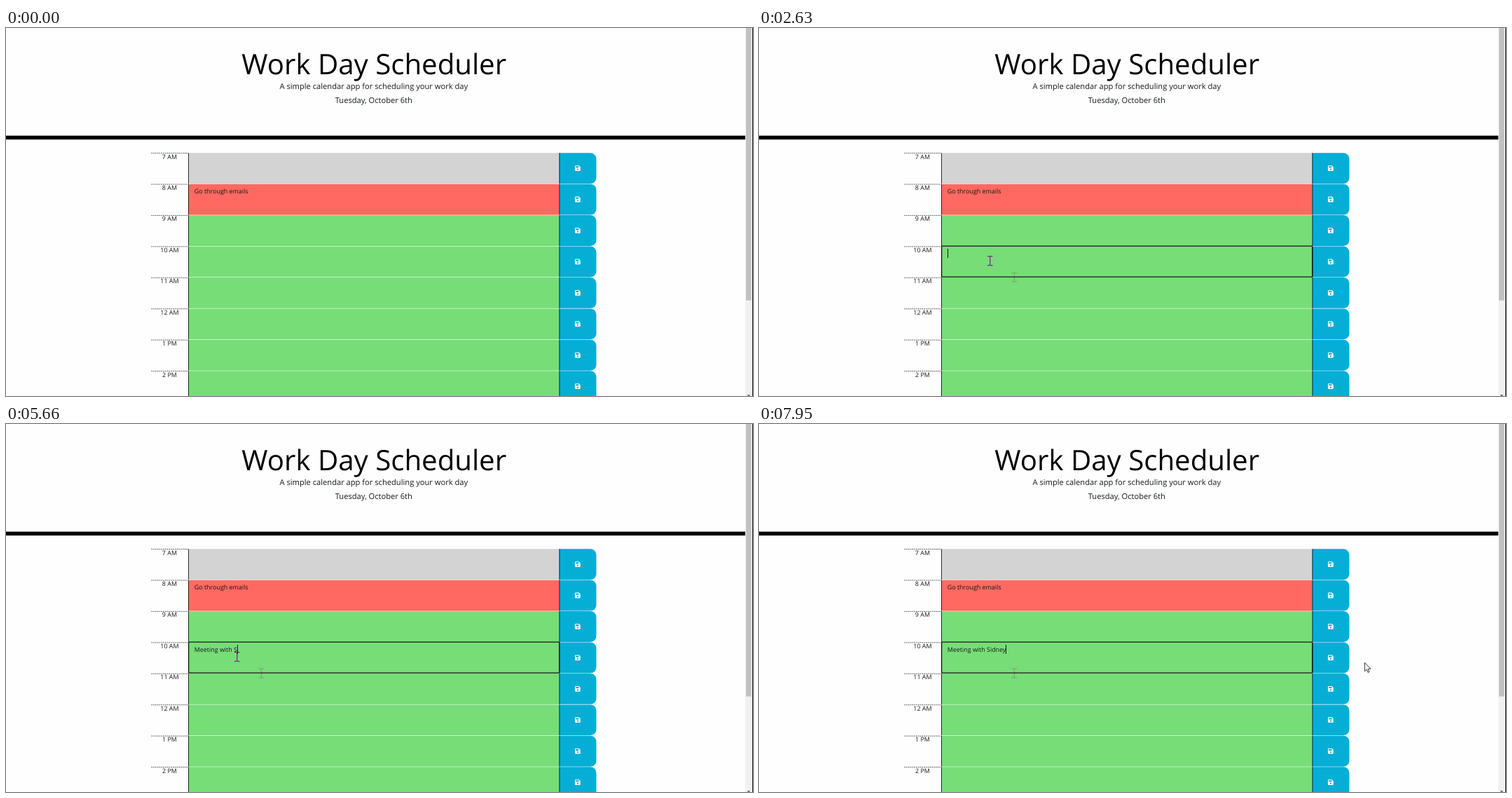
An HTML page for the animation above (8000 ms loop, 1066 by 525 pixels).

```html
<!DOCTYPE html>
<html lang="en">
<head>
<meta charset="utf-8">
<title>Work Day Scheduler</title>
<style>
html, body { margin: 0; width: 100%; height: 100%; overflow: hidden; background: #fefefe; }
svg { display: block; width: 1066px; height: 525px; }
text { font: 8.91px "Open Sans", sans-serif; fill: #16191c; white-space: pre; text-rendering: geometricPrecision; }
.mid { text-anchor: middle; }
.title { font-size: 40.2px; fill: #000; }
.lead { font-size: 11.15px; }
.beam { fill: none; stroke: #882288; stroke-width: 1.3; }
.ghost { stroke: #789a78; stroke-width: 1; }
.pointer { fill: #fff; stroke: #000; stroke-width: .8; stroke-linejoin: round; }
</style>
</head>
<body>
<svg viewBox="0 0 1066 525">
  <defs>
    <path id="beam" d="M-3.7-6.5H-1L0-6L1-6.5H3.7M0-6V6M-3.7 6.5H-1L0 6L1 6.5H3.7"/>
    <path id="disk" fill="#fff" fill-rule="evenodd" d="M1 0H5.8L7.8 2V6.8Q7.8 7.8 6.8 7.8H1Q0 7.8 0 6.8V1Q0 0 1 0ZM1.1 1.1V3.2H5.5V1.1ZM3.9 4.3A1.15 1.15 0 1 0 3.91 4.3Z"/>
  </defs>
  <text class="mid title" x="525.2" y="66">Work Day Scheduler</text>
  <text class="mid lead" x="524.8" y="87.3">A simple calendar app for scheduling your work day</text>
  <text class="mid lead" x="524.8" y="107.4">Tuesday, October 6th</text>
  <rect y="153.6" width="1055" height="5.5"/>
  <g id="rows"></g>
  <text x="268.8" y="235.6">Go through emails</text>

  <rect x="1055" width="10" height="525" fill="#f1f1f1"/>
  <rect x="1056" width="7.5" height="388.7" fill="#c1c1c1"/>
  <path d="M1057.6 523.2H1062L1059.8 525.6Z" fill="#505050"/>
  <rect x="1065" width="1" height="525" fill="#111"/>

  <use id="ghost" href="#beam" class="beam ghost" x="364.3" y="355.5"/>
  <rect id="focus" x="260.6" y="311.2" width="529" height="44" rx="1" fill="none" stroke="#0c120c" stroke-width="1.3"/>
  <g id="cursor">
    <use id="ibeam" href="#beam" class="beam"/>
    <path id="arrow" class="pointer" d="M.5 .5V12.8L3.3 10.1L5.2 14.4L7.2 13.5L5.3 9.3H9.1Z"/>
    <path id="hand" class="pointer" d="M-1 1Q0-.4 1 1V5.5L5.5 6.6Q6.6 7 6.4 8.4L5.4 13.5H-.5L-4 8.6Q-3.8 7.2-2.6 7.8L-1 9.2Z"/>
  </g>
  <circle id="click" cx="328.2" cy="331.4" r="10" fill="#f0f000" fill-opacity=".55"/>
  <text id="entry" x="268.8" y="324.6"></text>
  <rect id="caret" y="315" width="1" height="13" fill="#0a200a"/>
</svg>
<script>
const $ = id => document.getElementById(id);
const LOOP = 8000, TICK = 70, BLINK = 480, PRESS = 1540, FOCUS = 1660;
const ROW_TOP = 177.7, ROW_HEIGHT = 44.43, LINE = .56;

const hours = ["7 AM", "8 AM", "9 AM", "10 AM", "11 AM", "12 AM", "1 PM", "2 PM"];
$("rows").innerHTML = hours.map((hour, i) => {
  const y = ROW_TOP + ROW_HEIGHT * i + LINE, h = ROW_HEIGHT - LINE;
  const color = ["#d3d3d3", "#ff6961"][i] || "#77dd77";
  return `<rect x="260.3" y="${y}" width="529.4" height="${h}" fill="${color}"/>
    <rect x="260.2" y="${y}" width=".8" height="${h}"/>
    <path d="M789.6 ${y}h44.5a8.3 8.3 0 0 1 8.3 8.3v${h - 16.6}a8.3 8.3 0 0 1-8.3 8.3h-44.5Z" fill="#06aed5"/>
    <rect x="789.5" y="${y}" width=".8" height="${h}"/>
    <path d="M207.4 ${y + LINE / 2}H260.3" stroke="#000" stroke-width=".7" stroke-dasharray="1.67 1.11"/>
    <text class="mid" x="233.4" y="${y + 8.3}">${hour}</text>
    <use href="#disk" x="811.9" y="${y + 17.9}"/>`;
}).join("");

const easeOut = u => 1 - (1 - u) ** 2;
const smooth = u => u * u * (3 - 2 * u);
const moves = [
  { start: 500, end: 1205, to: [364.3, 355.5], ease: easeOut, sag: -4 },
  { start: 1250, end: 1530, to: [329.7, 332.2], ease: easeOut, sag: 0 },
  { start: 7240, end: 7660, to: [897, 332], ease: smooth, sag: 40 },
  { start: 7780, end: 7920, to: [863.8, 340], ease: easeOut, sag: 0 }
];

// "\b" deletes the letter before it
const bursts = [
  { text: "Met", start: 2710, end: 3390 },
  { text: "\beting ", start: 4020, end: 4740 },
  { text: "with ", start: 4970, end: 5360 },
  { text: "Sidney", start: 5660, end: 6560 }
];
const keys = bursts.flatMap(({ text, start, end }) =>
  [...text].map((key, i) => ({ key, time: start + (end - start) * i / (text.length - 1) })));

const show = (id, on) => $(id).setAttribute("visibility", on ? "visible" : "hidden");

function drawCursor(t) {
  let x = 1052, y = 512;
  for (const { start, end, to, ease, sag } of moves) {
    if (t < start) break;
    const held = Math.floor((t - start) / TICK) * TICK;
    const u = ease(Math.min(1, held / (end - start)));
    x += (to[0] - x) * u;
    y += (to[1] - y) * u + sag * Math.sin(Math.PI * u);
  }
  const kind = t < moves[0].start ? "" : x > 842 ? "arrow" : x > 790 ? "hand" : "ibeam";
  ["arrow", "hand", "ibeam"].forEach(id => show(id, id === kind));
  $("cursor").setAttribute("transform", `translate(${x} ${y})`);
}

function drawEntry(t) {
  const entry = $("entry");
  const pressed = keys.filter(k => k.time <= t);
  const typed = pressed.reduce((s, { key }) => key === "\b" ? s.slice(0, -1) : s + key, "");
  if (entry.textContent !== typed) entry.textContent = typed;
  const width = typed ? entry.getComputedTextLength() : 0;
  $("caret").setAttribute("x", Math.floor(269.1 + width));
  const last = pressed.length ? pressed[pressed.length - 1].time : FOCUS;
  show("caret", t >= FOCUS && Math.floor((t - last) / BLINK) % 2 === 0);
}

function draw(now) {
  const t = now % LOOP;
  drawCursor(t);
  drawEntry(t);
  show("ghost", t >= 1320);
  show("focus", t >= FOCUS);
  show("click", t >= PRESS && t < 1720);
  requestAnimationFrame(draw);
}
draw(performance.now());
</script>
</body>
</html>
```
